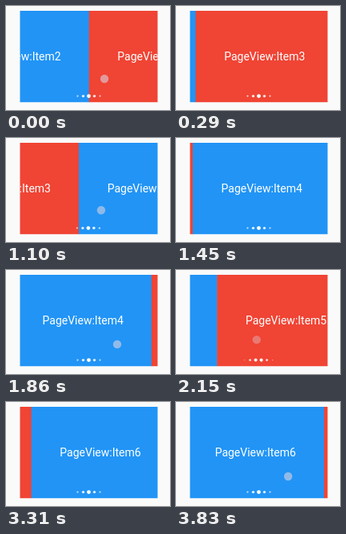
Write an HTML page that moves like this. It is 205 px wide and 130 px high and loops after 3850 ms.

```html
<!DOCTYPE html>
<html lang="en">
<head>
<meta charset="utf-8">
<title>PageView</title>
<style>
  html, body { margin: 0; width: 100%; height: 100%; overflow: hidden; background: #fafafa; }
  svg { display: block; width: 100vw; height: 100vh; }
  text { font: 14px Roboto, sans-serif; fill: #fff; text-anchor: middle; }
  #dots circle { fill: #fff; }
  #touch { fill: #dcd4e0; }
</style>
</head>
<body>
<svg viewBox="0 0 205 130">
  <clipPath id="card"><rect x="17.5" y="6" width="172" height="114.5"/></clipPath>
  <g clip-path="url(#card)">
    <g id="pages"></g>
    <g id="dots"></g>
    <circle id="touch" r="5.2"/>
  </g>
</svg>
<script>
  const LOOP = 3850, STEP = 58;
  const LEFT = 17.5, WIDTH = 172, FIRST = 2, LAST = 7;
  const GAP = 7, CENTER = 103.5;
  const RELEASES = [-67, 1014, 1965, 3027, 3950];
  const DRAG = [[-180, 0], [-120, .028], [-60, .12], [0, .25]];
  const FINGER_X = [[-247, 152], [-120, 140], [67, 123], [185, 100]];
  const FINGER_Y = [[-247, 91], [-120, 93], [67, 91], [185, 87]];
  const FADE = [[-310, 0], [-270, .62], [100, .58], [185, .36], [250, 0]];
  const RADII = [[0, 2.4], [1, 1.7], [2, 1.15], [3, 0]];

  const $ = id => document.getElementById(id);

  function add(parent, tag, attrs, text = '') {
    const el = document.createElementNS('http://www.w3.org/2000/svg', tag);
    for (const key in attrs) el.setAttribute(key, attrs[key]);
    el.textContent = text;
    return parent.appendChild(el);
  }

  // Linear interpolation through [x, y] points, clamped at both ends
  function lerp(points, x) {
    if (x <= points[0][0]) return points[0][1];
    for (let i = 1; i < points.length; i++) {
      const [x0, y0] = points[i - 1], [x1, y1] = points[i];
      if (x <= x1) return y0 + (y1 - y0) * (x - x0) / (x1 - x0);
    }
    return points[points.length - 1][1];
  }

  // Page travel: drag until release, then an overdamped spring
  function travel(ms) {
    if (ms < 0) return lerp(DRAG, ms);
    const s = ms / 1000;
    return 1 - 1.045 * Math.exp(-9.08 * s) + .295 * Math.exp(-22 * s);
  }

  for (let n = FIRST; n <= LAST; n++) {
    const x = LEFT + (n - FIRST) * WIDTH;
    add($('pages'), 'rect', { x, y: 6, width: WIDTH + .5, height: 114.5, fill: n % 2 ? '#f04434' : '#2194f6' });
    add($('pages'), 'text', { x: x + WIDTH / 2 + .3, y: 68 }, 'PageView:Item' + n);
  }

  const dots = [-2, -1, 0, 1, 2, 3].map(place =>
    ({ place, el: add($('dots'), 'circle', { cy: 112.6 }) }));

  function draw(t) {
    const page = RELEASES.reduce((sum, r) => sum + travel(t - r), 0);
    $('pages').setAttribute('transform', `translate(${-page * WIDTH} 0)`);

    const shift = RELEASES.reduce((sum, r) => {
      const u = t - r;
      return u > 70 && u < 270 ? (u - 70) / 200 : sum;
    }, 0);
    for (const { place, el } of dots) {
      const at = place - shift;
      el.setAttribute('cx', CENTER + GAP * at);
      el.setAttribute('r', lerp(RADII, Math.abs(at)));
      el.setAttribute('opacity', Math.max(0, 1 - Math.abs(at) * .14));
    }

    const release = RELEASES.find(r => t - r < 260);
    const u = t - release;
    const touch = $('touch');
    touch.setAttribute('cx', lerp(FINGER_X, u));
    touch.setAttribute('cy', lerp(FINGER_Y, u));
    touch.setAttribute('opacity', lerp(FADE, u));
  }

  const start = performance.now();
  function tick() {
    const t = (performance.now() - start) % LOOP;
    draw(Math.floor((t + 10) / STEP) * STEP);
    requestAnimationFrame(tick);
  }
  tick();
</script>
</body>
</html>
```
